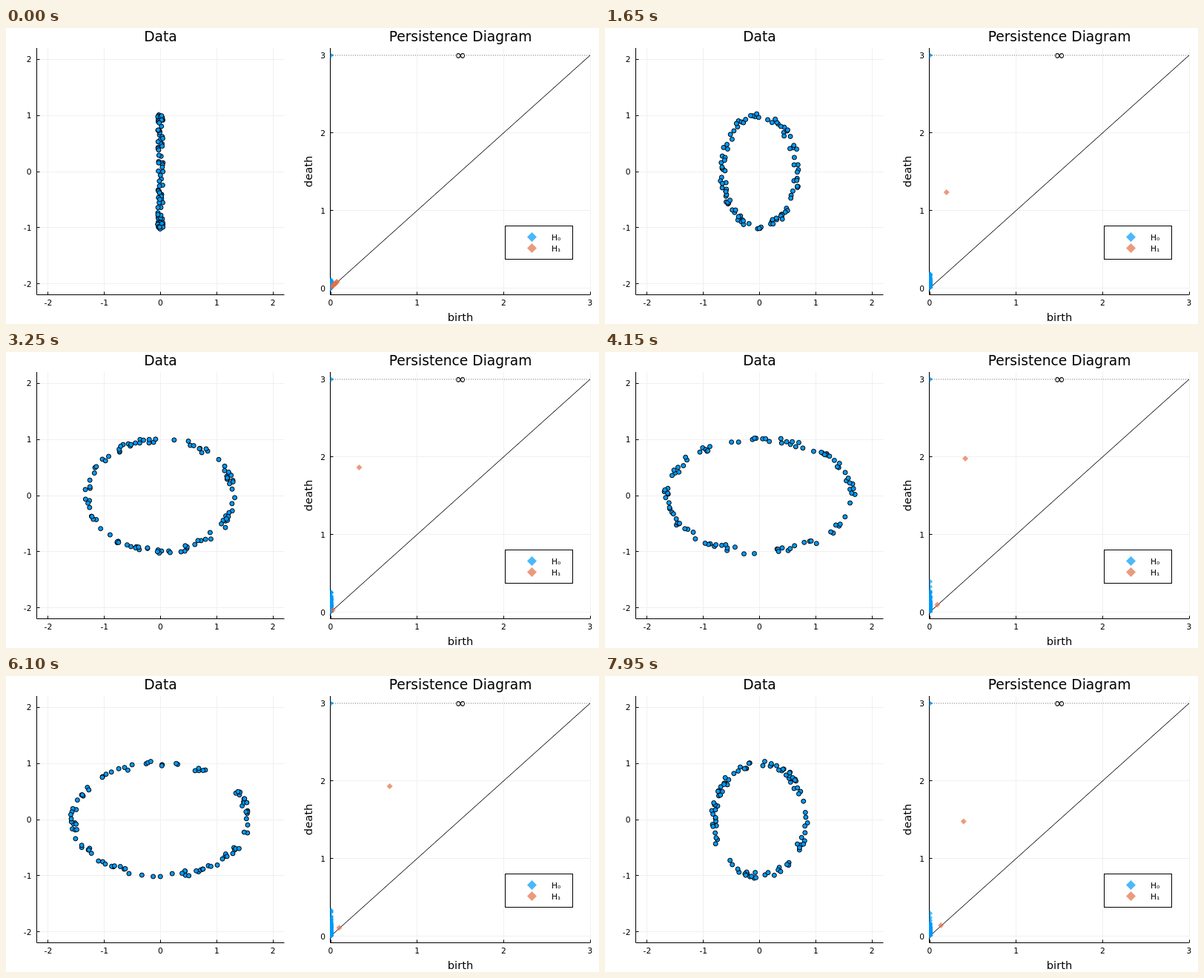
An HTML page with a canvas for the animation above (8 s loop, 800 by 400 pixels).

```html
<!DOCTYPE html>
<html lang="en">
<head>
<meta charset="utf-8">
<title>Persistence Diagram</title>
<style>
  html, body { margin: 0; width: 100%; height: 100%; overflow: hidden; background: #fff; }
  canvas { display: block; }
</style>
</head>
<body>
<canvas id="stage" width="800" height="400"></canvas>
<script>
const ctx = document.getElementById('stage').getContext('2d');
const STEP = 50, STEPS = 160, COUNT = 100, NOISE = 0.05;
const BLUE = '#009afa', ORANGE = '#e36f47';
const FONT = '"DejaVu Sans", sans-serif';

const dataPlot = {
  left: 41.5, right: 375.5, top: 27, bottom: 361,
  x: v => 208.5 + 75.8 * v, y: v => 194 - 75.85 * v,
  xTicks: [-2, -1, 0, 1, 2], yTicks: [-2, -1, 0, 1, 2],
};
const diagramPlot = {
  left: 438, right: 788, top: 27, bottom: 361,
  x: v => 438 + 116.67 * v, y: v => 351.5 - 104.87 * v,
  xTicks: [0, 1, 2, 3], yTicks: [0, 1, 2, 3],
};

function randomFrom(seed) {
  return () => {
    seed = (seed + 0x6D2B79F5) | 0;
    let r = Math.imul(seed ^ (seed >>> 15), 1 | seed);
    r = (r + Math.imul(r ^ (r >>> 7), 61 | r)) ^ r;
    return ((r ^ (r >>> 14)) >>> 0) / 4294967296;
  };
}

// A fresh noisy ellipse per step; its half width goes 0 → 2 → 0.
function samplePoints(step) {
  const random = randomFrom(step * 7919 + 17);
  const jitter = () => (random() * 2 - 1) * NOISE;
  const width = 2 - Math.abs(step - 100) * 0.02;
  return Array.from({ length: COUNT }, () => {
    const angle = random() * 2 * Math.PI;
    return [width * Math.cos(angle) + jitter(), Math.sin(angle) + jitter()];
  });
}

// Vietoris-Rips persistence: Kruskal for H0, cohomology reduction for H1.
function persistence(points) {
  const n = points.length, edges = [], rank = new Int32Array(n * n);
  const farthest = new Float64Array(n);
  for (let i = 0; i < n; i++) {
    for (let j = 0; j < i; j++) {
      const length = Math.hypot(points[i][0] - points[j][0], points[i][1] - points[j][1]);
      edges.push({ i, j, length });
      farthest[i] = Math.max(farthest[i], length);
      farthest[j] = Math.max(farthest[j], length);
    }
  }
  edges.sort((a, b) => a.length - b.length);
  edges.forEach(({ i, j }, r) => { rank[i * n + j] = rank[j * n + i] = r; });

  const parent = points.map((_, i) => i);
  const root = i => { while (parent[i] !== i) i = parent[i]; return i; };
  const h0 = [];
  for (const edge of edges) {
    const a = root(edge.i), b = root(edge.j);
    if (a === b) continue;
    parent[a] = b;
    edge.joins = true;
    h0.push([0, edge.length]);
  }

  // A triangle's key is its longest edge's rank, then the opposite vertex.
  const radius = Math.min(...farthest);
  const limit = edges.filter(e => e.length <= radius).length;
  function coboundary(r) {
    const { i, j } = edges[r], keys = [];
    for (let k = 0; k < n; k++) {
      if (k === i || k === j) continue;
      const ri = rank[i * n + k], rj = rank[j * n + k], top = Math.max(r, ri, rj);
      if (top < limit) keys.push(top * n + (top === r ? k : top === ri ? j : i));
    }
    return keys;
  }
  const lowest = keys => { let low = Infinity; for (const k of keys) if (k < low) low = k; return low; };

  const owners = new Map(), h1 = [];
  for (let r = limit - 1; r >= 0; r--) {
    if (edges[r].joins) continue;
    const column = new Set(coboundary(r));
    let pivot = lowest(column);
    while (owners.has(pivot)) {
      for (const key of owners.get(pivot)) if (!column.delete(key)) column.add(key);
      pivot = lowest(column);
    }
    if (pivot === Infinity) continue;
    owners.set(pivot, column);
    const death = Math.floor(pivot / n);
    if (death > r) h1.push([edges[r].length, edges[death].length]);
  }
  return { h0, h1 };
}

function line(x1, y1, x2, y2, color, width = 1, dash = []) {
  ctx.strokeStyle = color;
  ctx.lineWidth = width;
  ctx.setLineDash(dash);
  ctx.beginPath();
  ctx.moveTo(x1, y1);
  ctx.lineTo(x2, y2);
  ctx.stroke();
  ctx.setLineDash([]);
}

function text(string, x, y, size, align = 'center') {
  ctx.font = `${size}px ${FONT}`;
  ctx.textAlign = align;
  ctx.fillStyle = '#000';
  ctx.fillText(string, x, y);
}

function diamond(x, y, r, color) {
  ctx.globalAlpha = 0.7;
  ctx.fillStyle = color;
  ctx.beginPath();
  ctx.moveTo(x, y - r);
  ctx.lineTo(x + r, y);
  ctx.lineTo(x, y + r);
  ctx.lineTo(x - r, y);
  ctx.fill();
  ctx.globalAlpha = 1;
}

const crisp = v => Math.floor(v) + 0.5;

function drawAxes(plot, title) {
  const { left, right, top, bottom } = plot;
  const base = crisp(bottom - 0.5), side = crisp(left - 0.5);
  for (const v of plot.xTicks) line(crisp(plot.x(v)), top, crisp(plot.x(v)), bottom, '#f0f0f0');
  for (const v of plot.yTicks) line(left, crisp(plot.y(v)), right, crisp(plot.y(v)), '#f0f0f0');
  line(side, base, right, base, '#000');
  line(side, top, side, base, '#000');
  for (const v of plot.xTicks) {
    line(crisp(plot.x(v)), base, crisp(plot.x(v)), base - 4, '#000');
    text(v, plot.x(v), 375, 10.67);
  }
  for (const v of plot.yTicks) {
    line(side, crisp(plot.y(v)), side + 4, crisp(plot.y(v)), '#000');
    text(v, left - 7, plot.y(v) + 4, 10.67, 'right');
  }
  text(title, (left + right) / 2, 18, 18.67);
}

function drawData(points) {
  drawAxes(dataPlot, 'Data');
  ctx.fillStyle = BLUE;
  ctx.strokeStyle = '#000';
  ctx.lineWidth = 1;
  for (const [x, y] of points) {
    ctx.beginPath();
    ctx.arc(dataPlot.x(x), dataPlot.y(y), 3, 0, 2 * Math.PI);
    ctx.fill();
    ctx.stroke();
  }
}

function drawLegend() {
  ctx.fillStyle = '#fff';
  ctx.fillRect(673.5, 267.5, 91, 45);
  ctx.strokeStyle = '#000';
  ctx.lineWidth = 1;
  ctx.strokeRect(673.5, 267.5, 91, 45);
  diamond(709.5, 282.5, 6.5, BLUE);
  diamond(709.5, 297.5, 6.5, ORANGE);
  text('H₀', 736, 287, 10.67, 'left');
  text('H₁', 736, 302, 10.67, 'left');
}

function drawDiagram({ h0, h1 }) {
  const { x, y, left, right, top, bottom } = diagramPlot;
  drawAxes(diagramPlot, 'Persistence Diagram');
  text('birth', 613, 396, 14.67);
  ctx.save();
  ctx.translate(412.5, 194);
  ctx.rotate(-Math.PI / 2);
  text('death', 0, 0, 14.67);
  ctx.restore();

  line(x(0), y(0), x(3), y(3), '#000');
  line(left, 37, right, 37, '#888', 1, [1, 2]);
  ctx.save();
  ctx.beginPath();
  ctx.rect(left - 0.5, top, right - left + 0.5, bottom - top);
  ctx.clip();
  for (const [birth, death] of [...h0, [0, 3]]) diamond(x(birth), y(death), 4, BLUE);
  for (const [birth, death] of h1) diamond(x(birth), y(death), 4, ORANGE);
  ctx.restore();
  text('∞', 613, 43, 18.67);
  drawLegend();
}

const scenes = [];
function sceneAt(step) {
  if (!scenes[step]) {
    const points = samplePoints(step);
    scenes[step] = { points, diagram: persistence(points) };
  }
  return scenes[step];
}

let shown = -1;
function render() {
  const step = Math.floor(performance.now() / STEP) % STEPS;
  if (step !== shown) {
    shown = step;
    const { points, diagram } = sceneAt(step);
    ctx.fillStyle = '#fff';
    ctx.fillRect(0, 0, 800, 400);
    drawData(points);
    drawDiagram(diagram);
  }
  requestAnimationFrame(render);
}
render();
</script>
</body>
</html>
```
